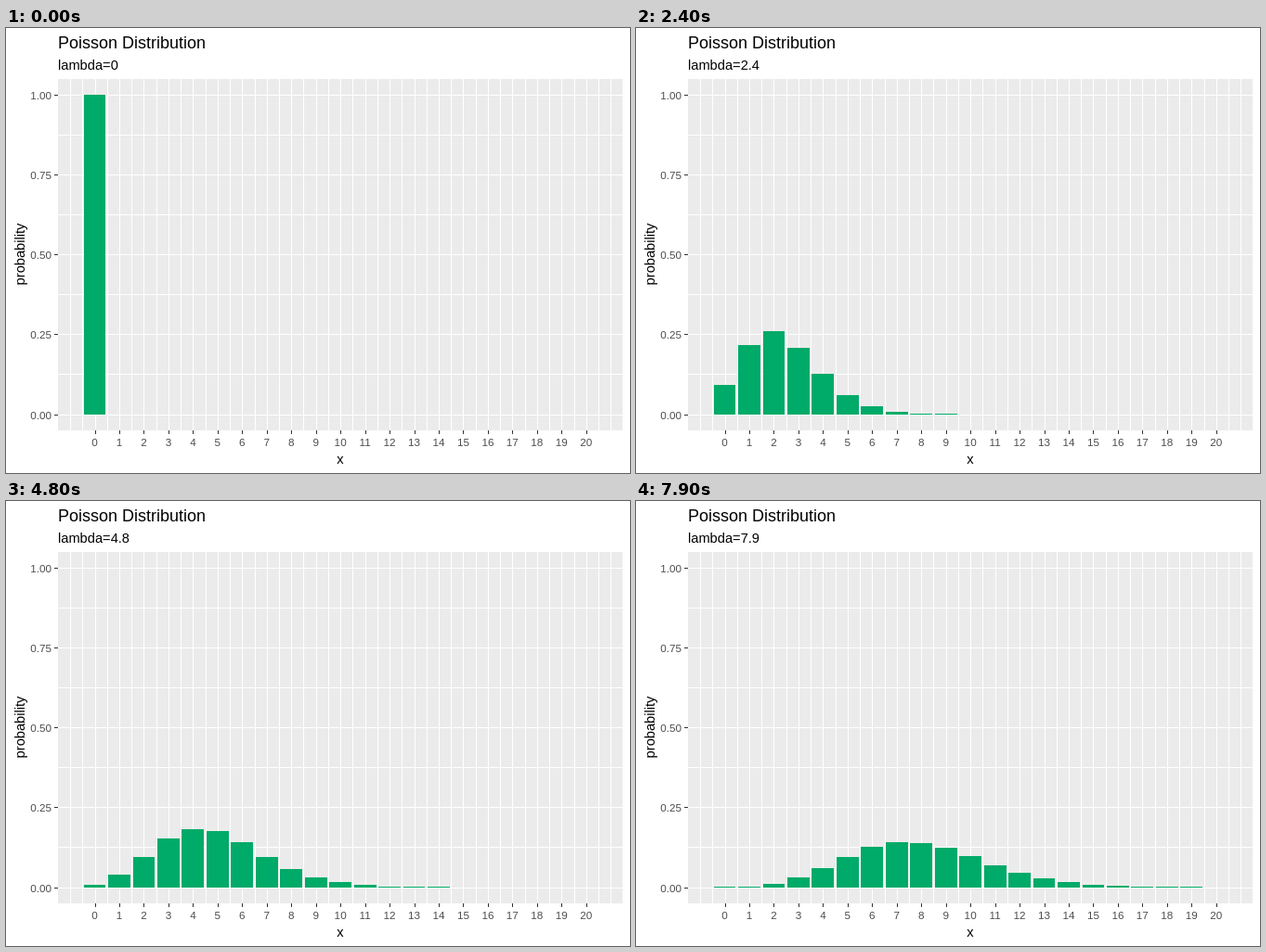
An HTML page for the animation above (8000 ms loop, 672 px wide and 480 px high).

```html
<!DOCTYPE html>
<html lang="en">
<head>
<meta charset="utf-8">
<title>Poisson Distribution</title>
<style>
  html, body { margin: 0; width: 100%; height: 100%; overflow: hidden; background: #fff; }
  svg { display: block; width: 672px; height: 480px; font-family: "Liberation Sans", Arial, sans-serif; }
  rect { shape-rendering: crispEdges; }
</style>
</head>
<body>
<svg id="chart" viewBox="0 0 672 480"></svg>
<script>
const chart = document.getElementById("chart");
const panel = { left: 56, top: 55, width: 608, height: 379 };
const unitX = 26.459, unitY = 344.545;
const xPos = v => 56 + (v + 1.495) * unitX;
const yPos = p => 416.565 - p * unitY;
const { round } = Math;

function add(tag, attrs, text = "") {
  const node = document.createElementNS("http://www.w3.org/2000/svg", tag);
  for (const key in attrs) node.setAttribute(key, attrs[key]);
  node.textContent = text;
  chart.append(node);
  return node;
}
const box = (x, y, width, height, fill) => add("rect", { x, y, width, height, fill });
const label = (text, x, y, size, fill = "#000", anchor = "start", extra = {}) =>
  add("text", { x, y, "font-size": size, fill, "text-anchor": anchor, ...extra }, text);

// Panel and grid
box(panel.left, panel.top, panel.width, panel.height, "#ebebeb");
for (let i = 0; i <= 8; i++) box(panel.left, round(yPos(i / 8)), panel.width, 1, "#fff");
for (let v = -1; v <= 21; v += 0.5) box(round(xPos(v)), panel.top, 1, panel.height, "#fff");

// Axes
for (let i = 0; i <= 4; i++) {
  const y = round(yPos(i / 4));
  box(52, y, 4, 1, "#333");
  label((i / 4).toFixed(2), 49, y + 5, 11.73, "#4d4d4d", "end");
}
const bars = [];
for (let k = 0; k <= 20; k++) {
  box(round(xPos(k)), 434, 1, 4, "#333");
  label(k, xPos(k), 451, 11.73, "#4d4d4d", "middle");
  const left = round(xPos(k - 0.45));
  bars.push(box(left, 417, round(xPos(k + 0.45)) - left, 0, "#00aa68"));
}

// Titles
label("Poisson Distribution", 56, 22, 18);
const subtitle = label("", 56, 45, 14.67);
label("x", 360, 470, 14.67, "#000", "middle");
label("probability", 20, 244, 14.67, "#000", "middle", { transform: "rotate(-90 20 244)" });

function draw(ms) {
  const lambda = Math.floor(ms % 8000 / 100) / 10;
  subtitle.textContent = "lambda=" + lambda;
  const base = round(yPos(0));
  let factorial = 1;
  bars.forEach((bar, k) => {
    factorial *= k || 1;
    const top = round(yPos(Math.exp(-lambda) * lambda ** k / factorial));
    bar.setAttribute("y", top);
    bar.setAttribute("height", base - top);
  });
}

const start = performance.now();
function tick() {
  draw(performance.now() - start);
  requestAnimationFrame(tick);
}
tick();
</script>
</body>
</html>
```
